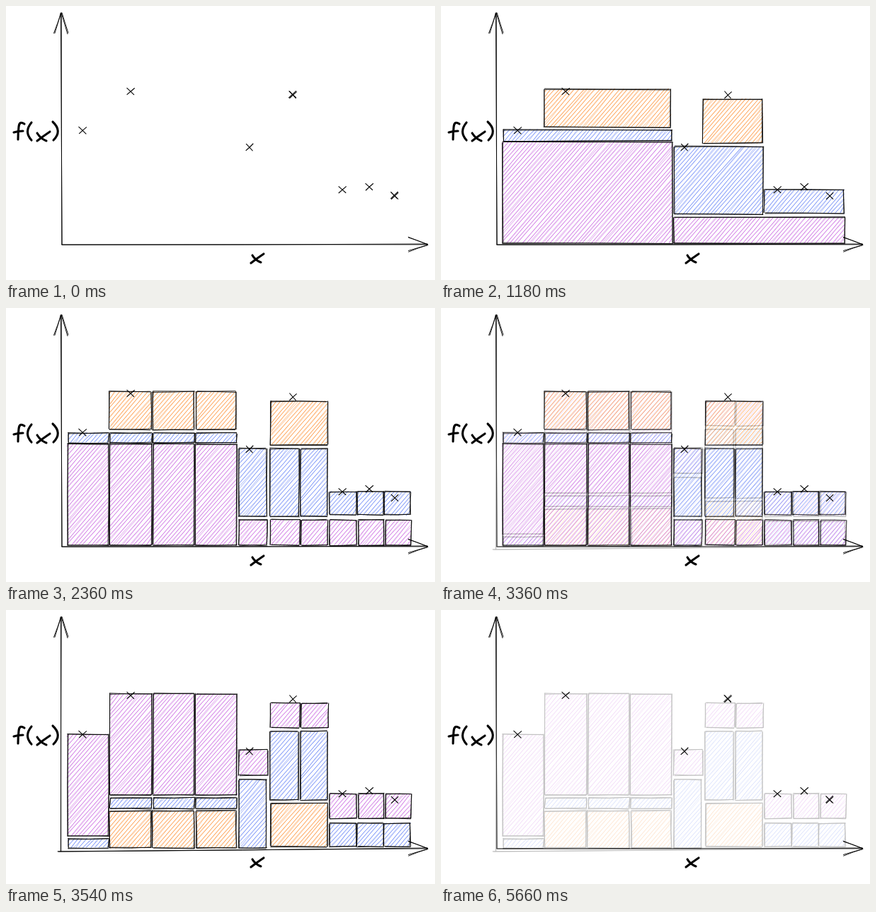
An HTML page with a canvas that plays this animation: 606 by 388 pixels, repeating every 5.72 s.

```html
<!DOCTYPE html>
<html lang="en">
<head>
<meta charset="utf-8">
<title>f(x) blocks</title>
<style>
html, body { margin: 0; width: 100%; height: 100%; overflow: hidden; background: #fff; }
canvas { display: block; }
</style>
</head>
<body>
<canvas id="stage" width="606" height="388" role="img" aria-label="f(x) over x"></canvas>
<script>
const W = 606, H = 388;
const PURPLE = '#be4bdb', BLUE = '#4c6ef5', ORANGE = '#fd7e14', INK = '#000';
const LOOP = 5720, STEP = 60, STARTS = [1000, 2180, 3360, 5540];

let seed = 7, g;
const rand = () => (seed = (seed * 16807) % 2147483647) / 2147483647;
const jit = r => (rand() * 2 - 1) * r;

// One hand-drawn line: slightly bowed, with loose ends.
function line(x1, y1, x2, y2, r = 1) {
  const bow = Math.min(1, Math.hypot(x2 - x1, y2 - y1) / 60) * r;
  g.beginPath();
  g.moveTo(x1 + jit(r), y1 + jit(r));
  g.quadraticCurveTo((x1 + x2) / 2 + jit(bow), (y1 + y2) / 2 + jit(bow), x2 + jit(r), y2 + jit(r));
  g.stroke();
}

function twice(...p) { line(...p); line(...p); }

function pen(color, width) {
  g.strokeStyle = color;
  g.lineWidth = width;
}

function block(color, x1, x2, y1, y2) {
  const m = 1.15, gap = 6.6;
  pen(color, 0.5);
  for (let c = y1 + m * x1 + gap / 2; c < y2 + m * x2; c += gap) {
    const a = Math.max(x1, (c - y2) / m), b = Math.min(x2, (c - y1) / m);
    twice(a, c - m * a, b, c - m * b, 1.3);
  }
  pen(INK, 0.85);
  twice(x1, y1, x2, y1);
  twice(x2, y1, x2, y2);
  twice(x2, y2, x1, y2);
  twice(x1, y2, x1, y1);
}

const row = (color, y1, y2, ...spans) => spans.forEach(([a, b]) => block(color, a, b, y1, y2));

function cross(x, y) {
  line(x - 5, y - 5, x + 5, y + 5, 0.5);
  line(x + 5.5, y - 5, x - 5, y + 5, 0.5);
}

function axes(x0, y0, left) {
  seed = 99;
  pen(INK, 0.9);
  twice(78, 10, x0, y0, 0.7);
  twice(left, y0, 596, 337.5, 0.7);
  for (const side of [-10, 10]) {
    twice(78, 10, 78 + side, 39);
    twice(596, 337.5, 568, 337.5 + side);
  }
}

function labels() {
  pen(INK, 3.1);
  g.lineCap = g.lineJoin = 'round';
  g.stroke(new Path2D(
    'M26 167Q19 162 18 171Q17 180 17 189M11 179Q17 177 24 177' +
    'M36 165Q25 178 36 190M44 180Q49 188 57 191M62 178Q53 184 44 191' +
    'M66 164Q80 177 67 190M348 353Q352 360 360 363M364 351Q355 357 346 364'));
  g.lineCap = 'butt';
}

function points(loose) {
  seed = 41;
  pen(INK, 1.1);
  [[108, 176], [176, 121], [344, 200], [405, 126], [475, 260], [513, 256], [549, 269]]
    .forEach(p => cross(...p));
  if (loose) {
    cross(404.5, 125);
    cross(548, 268);
  }
}

const mid = [[147, 206], [208, 266], [268, 326]];
const right = [[457, 495], [498, 534], [536, 572]];
const low = [[457, 495], [496, 533], [534, 571]];
const tops = [[146, 205], [207, 266], [269, 325]];

const scenes = [
  () => {},
  () => {
    row(PURPLE, 192.5, 336, [87, 327]);
    row(PURPLE, 299, 336, [329, 570]);
    row(BLUE, 175, 191, [88, 326]);
    row(BLUE, 199, 295, [329, 455]);
    row(BLUE, 260, 293, [457, 569]);
    row(ORANGE, 118, 172, [146, 324]);
    row(ORANGE, 132, 194, [370, 454]);
  },
  () => {
    row(PURPLE, 192.5, 336, [87, 145], ...mid);
    row(PURPLE, 300, 336, [329, 369], [374, 415], [417, 454], ...right);
    row(BLUE, 177, 191, [88, 145], ...mid);
    row(BLUE, 199, 295, [329, 368], [373, 414], [416, 454]);
    row(BLUE, 260, 293, ...low);
    row(ORANGE, 118.5, 172, ...tops);
    row(ORANGE, 132, 194, [374, 454]);
  },
  () => {
    row(PURPLE, 176, 320, [87, 145]);
    row(PURPLE, 118.5, 262, ...mid);
    row(PURPLE, 198, 234, [329, 370]);
    row(PURPLE, 132, 167, [374, 415], [417, 455]);
    row(PURPLE, 260, 295, ...right);
    row(BLUE, 324, 337, [88, 145]);
    row(BLUE, 266, 281, ...mid);
    row(BLUE, 240, 337, [329, 368]);
    row(BLUE, 172, 269, [373, 413], [416, 454]);
    row(BLUE, 302, 335, ...low);
    row(ORANGE, 284.5, 337, ...tops);
    row(ORANGE, 274, 335, [374, 454]);
  }
].map((draw, i) => {
  const sheet = document.createElement('canvas');
  sheet.width = W;
  sheet.height = H;
  g = sheet.getContext('2d');
  g.fillStyle = '#fff';
  g.fillRect(0, 0, W, H);
  seed = 1234;
  draw();
  if (i === 3) axes(77, 342, 73);
  else axes(78.5, 338, 78.5);
  labels();
  points(i === 0);
  return sheet;
});

const out = document.getElementById('stage').getContext('2d');

// Each change is a cross-fade in four equal steps.
function frame(now) {
  const t = now % LOOP;
  const k = STARTS.filter(s => s <= t).length;
  out.globalAlpha = 1;
  out.drawImage(scenes[Math.max(0, k - 1)], 0, 0);
  if (k) {
    out.globalAlpha = Math.min(1, (Math.floor((t - STARTS[k - 1]) / STEP) + 1) / 4);
    out.drawImage(scenes[k % 4], 0, 0);
  }
  requestAnimationFrame(frame);
}
requestAnimationFrame(frame);
</script>
</body>
</html>
```
